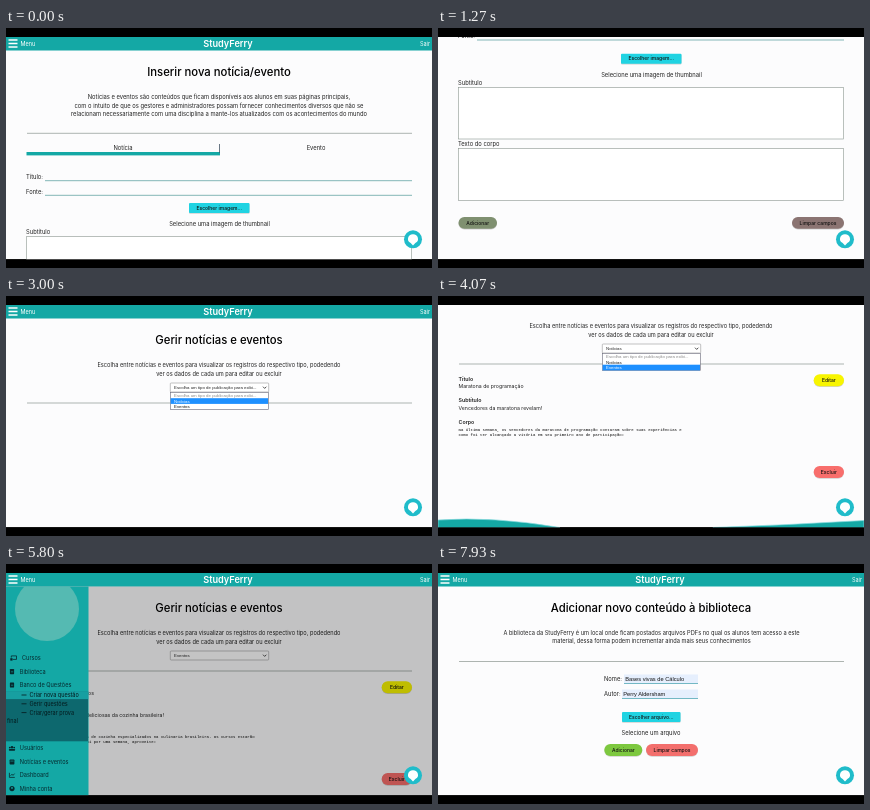
These frames come from a looping animation (426 px wide and 240 px high, 8000 ms). An HTML page:

```html
<!DOCTYPE html>
<html lang="pt">
<head>
<meta charset="utf-8">
<title>Painel</title>
<style>
html, body { margin: 0; width: 100%; height: 100%; overflow: hidden; background: #000; }
svg { display: block; width: 100%; height: 100%; }
text { font-family: Inter, "Open Sans", sans-serif; font-size: 5.8px; fill: #222; white-space: pre; }
.title { font-size: 11.3px; font-weight: 500; fill: #000; }
.wide { font-size: 5.67px; }
.brand { font-size: 9.2px; font-weight: 600; fill: #fff; }
.nav { font-size: 5.5px; fill: #fff; }
.btn { font-size: 5px; font-weight: 500; fill: #111; }
.head { font-size: 5.3px; font-weight: 600; }
.val { font-size: 5.2px; }
.mono { font: 4px "Liberation Mono", monospace; fill: #000; }
.opt { font: 4.35px "Liberation Sans", sans-serif; }
.auto { font: 5.7px "Liberation Sans", sans-serif; fill: #111; }
.side { font-size: 5.6px; fill: #06292e; }
.sub { font-size: 5.5px; fill: #04191c; }
</style>
</head>
<body>
<svg id="stage" viewBox="0 0 426 240"></svg>
<script>
const LOOP = 8000, FPS = 15;
const TEAL = '#14a8a5', CYAN = '#20d3e2', RULE = '#8b9690', INK = '#06292e';

const text = (x, y, s, cls = '', anchor = 'start', extra = '') =>
  `<text x="${x}" y="${y}" class="${cls}" text-anchor="${anchor}" ${extra}>${s}</text>`;
const mid = (x, y, s, cls) => text(x, y, s, cls, 'middle');
const rect = (x, y, w, h, fill, extra = '') =>
  `<rect x="${x}" y="${y}" width="${w}" height="${h}" fill="${fill}" ${extra}/>`;
const rule = (x1, x2, y, color = RULE, w = 0.7) =>
  `<path d="M${x1} ${y}H${x2}" stroke="${color}" stroke-width="${w}"/>`;
const group = (id, s, extra = '') => `<g id="${id}" ${extra}>${s}</g>`;
const button = (x, y, w, h, r, fill, label) =>
  rect(x, y + 0.8, w, h, '#000', `rx="${r}" opacity=".18"`) +
  rect(x, y, w, h, fill, `rx="${r}"`) + mid(x + w / 2, y + h / 2 + 1.8, label, 'btn');
const box = (x, y, w, h) => rect(x, y, w, h, '#fff', `stroke="${RULE}" stroke-width=".6"`);
const lines = (x, y, step, list, cls, anchor) =>
  list.map((s, i) => text(x, y + i * step, s, cls, anchor)).join('');

const header = rect(0, 9, 426, 13.5, TEAL) +
  [12, 15.5, 19].map(y => rule(2.5, 11.5, y, '#fff', 1.5)).join('') +
  text(14.5, 18, 'Menu', 'nav') + mid(222, 19, 'StudyFerry', 'brand') +
  text(424, 18, 'Sair', 'nav', 'end');

const formPage = header +
  mid(213, 48, 'Inserir nova notícia/evento', 'title') +
  lines(213, 71, 8.5, [
    'Notícias e eventos são conteúdos que ficam disponíveis aos alunos em suas páginas principais,',
    'com o intuito de que os gestores e administradores possam fornecer conhecimentos diversos que não se',
    'relacionam necessariamente com uma disciplina a mante-los atualizados com os acontecimentos do mundo'
  ], '', 'middle') +
  rule(21, 406, 105.3) +
  mid(117, 122, 'Notícia') + mid(310, 122, 'Evento') +
  rect(20.5, 124, 193.5, 3.4, TEAL) + rect(213.2, 116, 0.8, 9, '#456') +
  group('fields',
    text(20, 151, 'Título:') + rule(39, 406, 152.7, '#4f9a98') +
    text(20, 165.7, 'Fonte:') + rule(39, 406, 167.3, '#4f9a98')) +
  button(183, 175, 60.5, 10, 1, CYAN, 'Escolher imagem...') +
  mid(213.5, 198, 'Selecione uma imagem de thumbnail') +
  text(20, 206.2, 'Subtítulo') + box(20.5, 208.7, 385, 51.6) +
  text(20, 267, 'Texto do corpo') + box(20.5, 269.7, 385, 52) +
  button(20.5, 338.3, 38.5, 11.7, 5.8, '#7f9070', 'Adicionar') +
  button(354, 338.3, 52, 11.7, 5.8, '#8b7472', 'Limpar campos');

const record = (id, title, subtitle, body) => group(id,
  text(20.5, 124, 'Título', 'head') + text(20.5, 131, title, 'val') +
  text(20.5, 145, 'Subtítulo', 'head') + text(20.5, 152.8, subtitle, 'val') +
  text(20.5, 167, 'Corpo', 'head') + lines(20.5, 173.8, 5.3, body, 'mono'));

const PROMPT = 'Escolha um tipo de publicação para exibi...';
const OPTIONS = [PROMPT, 'Notícias', 'Eventos'];

const managePage = header +
  mid(213, 48, 'Gerir notícias e eventos', 'title') +
  lines(213, 71, 8.5, [
    'Escolha entre notícias e eventos para visualizar os registros do respectivo tipo, podedendo',
    'ver os dados de cada um para editar ou excluir'
  ], 'wide', 'middle') +
  rule(21, 406, 107) +
  group('records',
    record('news', 'Maratona de programação', 'Vencedores da maratona revelam!', [
      'Na última semana, os vencedores da maratona de programação contaram sobre suas experiências e',
      'como foi ter alcançado a vitória em seu primeiro ano de participação!']) +
    record('event', 'Mais cursos gastronômicos',
      'Aprenda várias receitas deliciosas da cozinha brasileira!', [
      'Na próxima semana há aulas de cozinha especializados na culinaria brasileira. Os cursos estarão',
      'abertos para inscrição aqui por uma semana, aproveite!']) +
    button(375.7, 117.3, 30.3, 12, 6, '#f8f500', 'Editar') +
    button(375.7, 209, 30.3, 12, 6, '#f86e6c', 'Excluir') +
    `<path d="M0 263Q55 259 122 270.5L0 272ZM275 270.5Q350 268 426 263.5V272H275Z" fill="${TEAL}" stroke="#8adbe0" stroke-width=".7"/>`) +
  rect(164.3, 87, 98.4, 9, '#fff', 'rx=".8" stroke="#999" stroke-width=".6"') +
  text(168, 93.1, PROMPT, 'opt', 'start', 'id="choice"') +
  '<path d="M257 90.7l1.7 1.7 1.7-1.7" fill="none" stroke="#222" stroke-width=".8"/>' +
  group('list',
    rect(164.3, 96.3, 98, 17.3, '#fff', 'stroke="#667" stroke-width=".6"') +
    rect(164.6, 102.2, 97.4, 5.7, '#1e90ff', 'id="mark"') +
    OPTIONS.map((s, i) => text(168, 101.1 + i * 5.5, s, 'opt', 'start', `id="opt${i}"`)).join(''));

const autofill = (id, x, y, value) => rule(x, 260, y + 9, '#3f9fae', 0.8) +
  group(id, rect(x, y, 260 - x, 8.6, '#e6effd') + text(x + 1.3, y + 6.2, value, 'auto'));

const libraryPage = header +
  mid(213, 48, 'Adicionar novo conteúdo à biblioteca', 'title') +
  lines(213.5, 71, 8.3, [
    'A biblioteca da StudyFerry é um local onde ficam postados arquivos PDFs no qual os alunos tem acesso a este',
    'material, dessa forma podem incrementar ainda mais seus conhecimentos'
  ], 'wide', 'middle') +
  rule(21, 406, 97.5) +
  text(166, 117, 'Nome:') + autofill('name', 186, 110.5, 'Bases vivas de Cálculo') +
  text(166, 132, 'Autor:') + autofill('author', 184, 125.5, 'Perry Aldersham') +
  button(184, 148, 58.5, 10, 1, CYAN, 'Escolher arquivo...') +
  mid(213, 171, 'Selecione um arquivo') +
  button(166.3, 180, 38, 12, 6, '#7dc83f', 'Adicionar') +
  button(208, 180, 52, 12, 6, '#f36f6d', 'Limpar campos');

const ROW = 13.4, FIRST = 107.6;
const stroked = d => `<path d="${d}" fill="none" stroke="${INK}" stroke-width=".8"/>`;
const dot = (x, y, r) => `<circle cx="${x}" cy="${y}" r="${r}" fill="${INK}"/>`;
const page = rect(-2.1, -2.6, 4.2, 5.2, INK, 'rx=".6"') + rule(-1, 1.2, 0.2, TEAL, 0.6);
const MENU = [
  ['Cursos', stroked('M-2-2.3H3.2V1.2H-.6M-2-2.3V-.6') + rect(-3, 0, 2.2, 2.4, INK)],
  ['Biblioteca', page],
  ['Banco de Questões', page],
  ['Usuários', dot(0, -1.2, 1.3) + dot(-2.2, -0.8, 0.9) + dot(2.2, -0.8, 0.9) +
    rect(-3.2, 0.5, 6.4, 1.8, INK, 'rx=".9"')],
  ['Notícias e eventos', rect(-2.4, -2.2, 4.8, 4.8, INK, 'rx=".6"') + rule(-1.6, 1.6, -0.7, TEAL, 0.6)],
  ['Dashboard', stroked('M-2.6-2.4V2.2H2.8M-1.5.6L0-1L1 .2L2.6-1.6')],
  ['Minha conta', dot(0, 0, 2.6) + `<circle cy="-.7" r=".9" fill="${TEAL}"/>`]
];
const item = ([label, icon], i) => {
  const y = FIRST + i * ROW;
  return `<g transform="translate(${i ? 6 : 7.3} ${y})">${icon}</g>` +
    text(i ? 13.8 : 16, y + 2, label, 'side');
};
const items = MENU.map(item);
const subRow = (label, i) => rule(15.5, 20.5, 144.4 + i * 8.8, '#04191c', 0.8) +
  text(23.5, 146.4 + i * 8.8, label, 'sub');

const sidebar = rect(0, 22.5, 82.5, 209, TEAL) +
  `<g clip-path="url(#sideClip)">` + group('sideBody',
    '<circle cx="41" cy="58.5" r="32" fill="#55bab2"/>' +
    rect(0, 0, 82.5, ROW, '#1cc4c8', 'id="hover"') +
    items.slice(0, 3).join('') +
    `<g clip-path="url(#subClip)">` + rect(0, 140.5, 82.5, 50.5, '#0d686e') +
    rect(0, 140.5, 82.5, 8, '#179fa1') +
    ['Criar nova questão', 'Gerir questões', 'Criar/gerar prova'].map(subRow).join('') +
    text(1, 172, 'final', 'sub') + '</g>' +
    group('sideRest', items.slice(3).join(''))) + '</g>';

const chat = '<circle cx="407" cy="211.3" r="9" fill="#20bcca"/>' +
  '<path d="M407 206.2a4.9 4.7 0 0 1 2.3 8.9L407 217.4L404.7 215.1A4.9 4.7 0 0 1 407 206.2Z" fill="#fff"/>';

const stage = document.getElementById('stage');
stage.innerHTML =
  '<defs><clipPath id="view"><rect x="0" y="9" width="426" height="222.3"/></clipPath>' +
  '<clipPath id="sideClip"><rect x="0" y="22.5" width="82.5" height="209"/></clipPath>' +
  '<clipPath id="subClip"><rect id="subBox" x="0" y="140.5" width="82.5" height="0"/></clipPath></defs>' +
  rect(0, 0, 426, 240, '#000') +
  '<g clip-path="url(#view)">' + rect(0, 9, 426, 222.3, '#fcfcfd') +
  group('form', formPage) + group('manage', managePage) + group('library', libraryPage) +
  rect(0, 22.5, 426, 209, '#000', 'id="shade"') + group('sidebar', sidebar) + chat + '</g>';

const el = {};
stage.querySelectorAll('[id]').forEach(n => { el[n.id] = n; });

const show = (id, on) => el[id].setAttribute('display', on ? 'inline' : 'none');
const move = (id, x, y) => el[id].setAttribute('transform', `translate(${x} ${y})`);
const ease = (t, a, b) => {
  const p = Math.min(1, Math.max(0, (t - a) / (b - a)));
  return p * p * (3 - 2 * p);
};
const within = (t, a, b) => t >= a && t < b;

const CUT = { manage: 1860, news: 3320, event: 4320, library: 6660 };

function draw(t) {
  show('form', t < CUT.manage);
  show('manage', within(t, CUT.manage, CUT.library));
  show('library', t >= CUT.library);

  const down = ease(t, 330, 860);
  move('form', 0, -149.3 * down);
  move('fields', 0, -6 * down);
  move('manage', 0, -39 * (ease(t, 3520, 3800) - ease(t, 4520, 4760)));

  const choice = t < CUT.news ? 0 : t < CUT.event ? 1 : 2;
  el.choice.textContent = OPTIONS[choice];
  show('records', choice > 0);
  show('news', choice === 1);
  show('event', choice === 2);
  show('list', within(t, 2660, CUT.news) || within(t, 3860, CUT.event));
  const active = t < 2860 ? 0 : t < 3990 ? 1 : 2;
  el.mark.setAttribute('y', 96.7 + active * 5.5);
  OPTIONS.forEach((s, i) => {
    el['opt' + i].style.fill = i === active ? '#fff' : i ? '#111' : '#888';
  });

  const open = t < CUT.library ? ease(t, 4840, 5120) : 0;
  show('sidebar', open > 0);
  move('sidebar', -82.5 * (1 - open), 0);
  el.shade.setAttribute('opacity', 0.23 * open);
  const grow = ease(t, 5390, 5600) - ease(t, 6120, 6320);
  el.subBox.setAttribute('height', 50.5 * grow);
  move('sideRest', 0, 50 * grow);
  move('sideBody', 0, -13.4 * grow);
  show('hover', within(t, 5120, 5460) || t >= 6320);
  el.hover.setAttribute('y', FIRST - ROW / 2 + ROW * (t < 6000 ? 2 : 1));

  show('name', t >= 7190);
  show('author', t >= 7520);
}

const start = performance.now();
function tick() {
  const t = Math.max(0, performance.now() - start) % LOOP;
  draw(Math.floor((t + 5) * FPS / 1000) * 1000 / FPS);
  requestAnimationFrame(tick);
}
tick();
</script>
</body>
</html>
```
